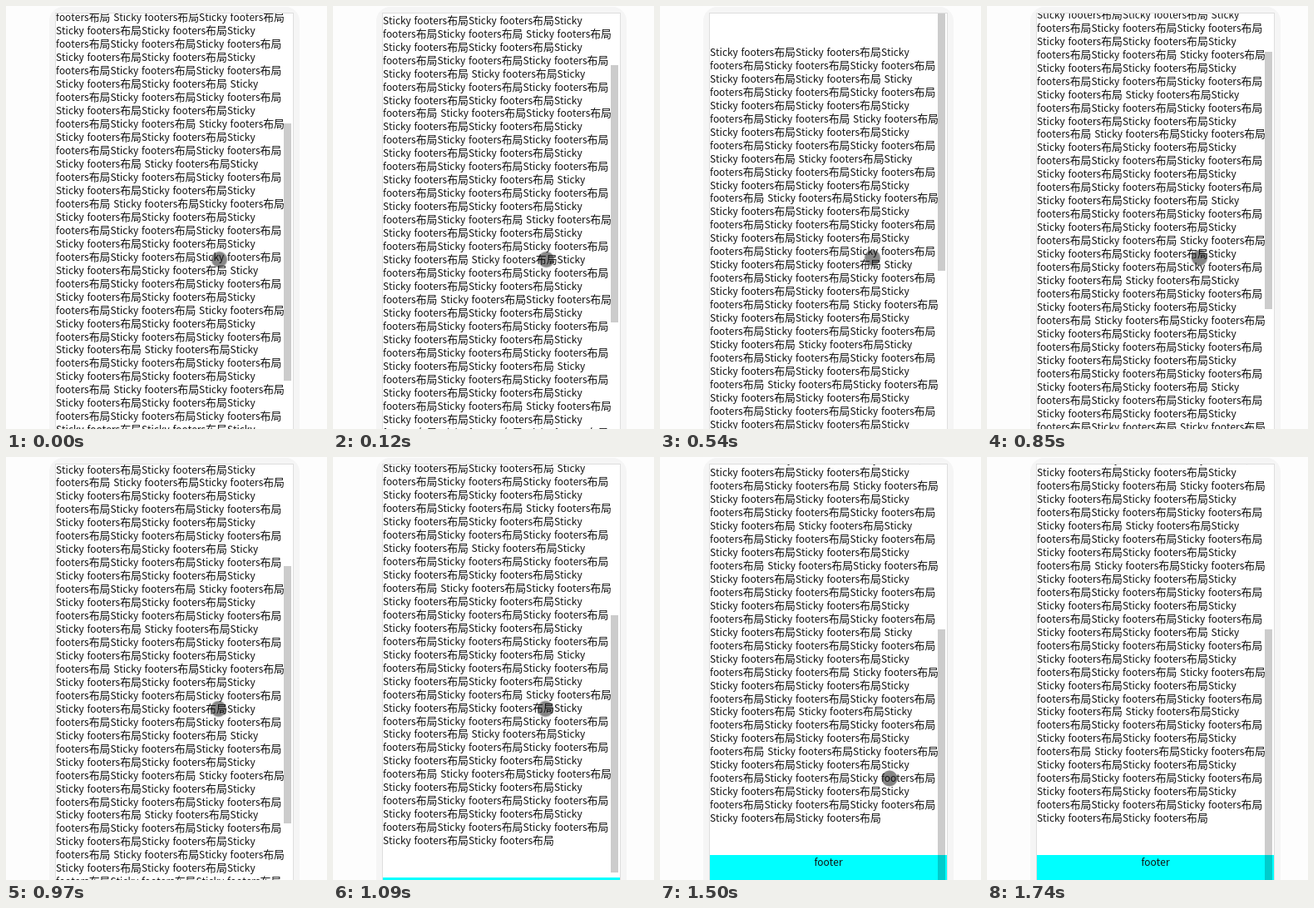
These frames come from a looping animation (386x508 px, 2.3 s). An HTML page:

```html
<!DOCTYPE html>
<html lang="zh-CN">
<head>
<meta charset="utf-8">
<title>Sticky footer scroll</title>
<style>
  html, body { margin: 0; width: 100%; height: 100%; overflow: hidden; background: #fdfdfd; }
  .stage { position: relative; width: 386px; height: 508px; overflow: hidden; }
  .stage div { position: absolute; }

  .phone {
    left: 52px; top: 1px; width: 301px; height: 540px;
    border-radius: 17px; background: #f5f5f5;
  }
  .screen {
    left: 59px; top: 8px; width: 285px; height: 507px;
    border: 1px solid #dedede; background: #fff; overflow: hidden;
    animation: scroll 2300ms step-end infinite;
  }
  .page {
    left: 0; top: 0; width: 285px; height: 831px;
    transform: translateY(calc(var(--y) * -1px));
    font: 11.95px/16px "Noto Sans CJK SC", "Noto Sans CJK JP", "Open Sans", sans-serif;
    font-kerning: none; font-variant-ligatures: none;
    word-spacing: 1px; color: #111;
  }
  .line { left: 0; height: 16px; white-space: pre; }
  .line span { font-size: 12.9px; line-height: 0; }
  .footer { left: 0; top: 793px; width: 285px; height: 38px; background: #0ff; text-align: center; }
  .bar {
    left: 274px; top: 0; width: 9px; height: 309px;
    background: rgba(0, 0, 0, .2);
    transform: translateY(round(max(0px, var(--y) * .613px - 1px), 1px));
  }
  .touch {
    left: -10px; top: -10px; width: 20px; height: 20px; border-radius: 50%;
    background: radial-gradient(closest-side, rgba(0, 0, 0, .47) 88%, rgba(0, 0, 0, .3) 94%, transparent);
    animation: touch 2300ms step-end infinite;
  }

  @keyframes scroll {
    0% { --y: 217; }
    5.217% { --y: 102; }
    11.739% { --y: 20; }
    17.391% { --y: 0; }
    36.957% { --y: 77; }
    42.174% { --y: 200; }
    47.391% { --y: 297; }
    53.913%, 100% { --y: 324; }
  }
  @keyframes touch {
    0% { transform: translate(256.5px, 304.5px); }
    23.478% { transform: translate(255.5px, 302.5px); }
    59.13% { transform: translate(256.5px, 314px); }
    65.217% { transform: translate(276px, 386px); }
    70.435% { transform: translate(306px, 496px); }
    75.652%, 100% { transform: translate(320px, 560px); }
  }
</style>
</head>
<body>
<div class="stage">
  <div class="phone"></div>
  <div class="screen">
    <div class="page"><div class="footer">footer</div></div>
    <div class="bar"></div>
  </div>
  <div class="touch"></div>
</div>
<script>
  // Five phrases fill two lines; a space follows every seventh phrase.
  let text = '';
  for (let i = 0; i < 112; i++) {
    text += 'Sticky' + (i % 5 === 2 ? '\n' : ' ') + 'footers<span>布局</span>';
    text += i % 5 === 4 ? '\n' : i % 7 === 6 ? ' ' : '';
  }

  const page = document.querySelector('.page');
  text.split('\n').forEach((html, i) => {
    const line = document.createElement('div');
    line.className = 'line';
    line.innerHTML = html;
    // The pitch is 16px, one pixel less every 25 lines.
    line.style.top = 38 + 16 * i - Math.floor((i + 14) / 25) + 'px';
    page.append(line);
  });
</script>
</body>
</html>
```
